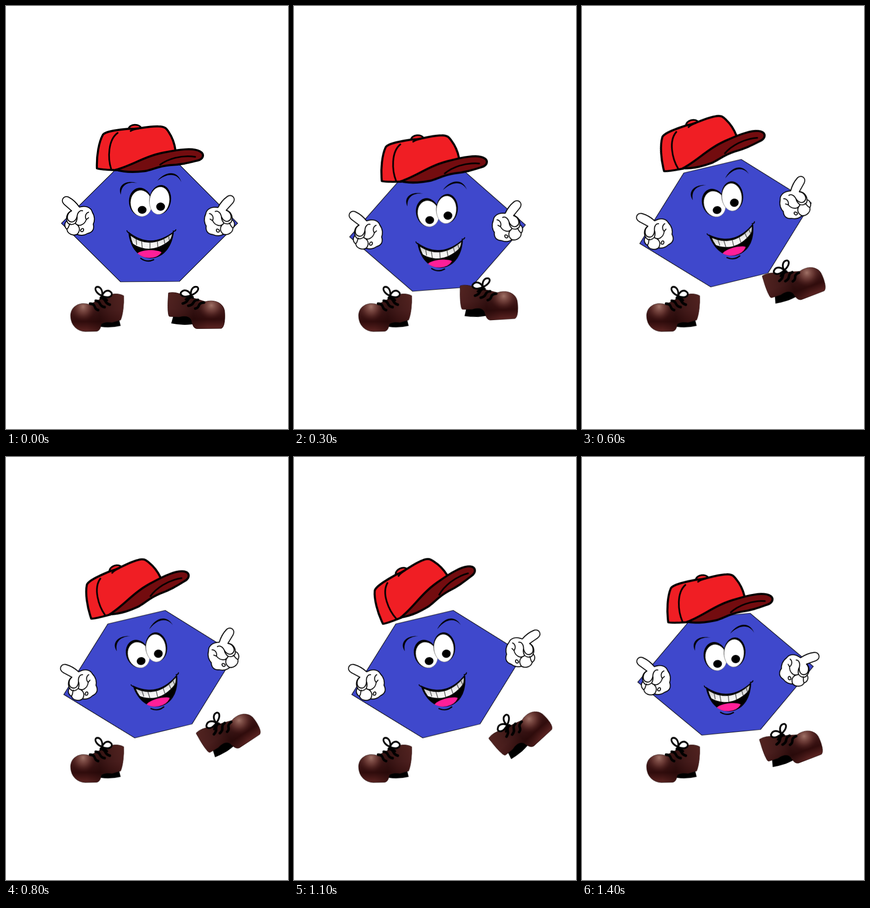
Recreate the animation shown at these times as an HTML page without scripts. Size 611 px wide and 917 px high, loop 1500 ms.

```html
<!DOCTYPE html>
<html lang="en">
<head>
<meta charset="utf-8">
<title>Dancing hexagon</title>
<style>
  html, body { margin: 0; width: 100%; height: 100%; overflow: hidden; background: #fff; }
  svg { display: block; width: 100%; height: 100%; }

  /* Ten poses a second: each span between keyframes is cut into 100 ms steps. */
  .move { animation: 1.5s steps(2) infinite; }
  #body { animation-name: body; transform-origin: 311px 471px; }
  #face { animation-name: face; transform-origin: 311px 471px; }
  #cap { animation-name: cap; transform-origin: 312px 339px; }
  #left-hand { animation-name: left-hand; transform-origin: 163px 468px; }
  #right-hand { animation-name: right-hand; transform-origin: 460px 469px; }
  #right-shoe { animation-name: right-shoe; transform-origin: 412px 660px; }

  @keyframes body {
    0%, 100% { transform: translate(0, 0) rotate(0deg); }
    13.333% { transform: translate(0, 33px) rotate(0deg); }
    26.666% { transform: translate(0, 0) rotate(-7.8deg); }
    40% { transform: translate(0, 0) rotate(-13.3deg); }
    73.333% { transform: translate(0, 0) rotate(-13.3deg); animation-timing-function: steps(3); }
    93.333% { transform: translate(0, 0) rotate(-5.1deg); animation-timing-function: steps(1); }
  }
  @keyframes face {
    0%, 100% { transform: translate(0, 0) rotate(0deg); }
    13.333% { transform: translate(0, 33px) rotate(0deg); }
    26.666% { transform: translate(2px, 9px) rotate(-7.8deg); }
    40% { transform: translate(4px, -4px) rotate(-13.3deg); }
    73.333% { transform: translate(4px, -4px) rotate(-13.3deg); animation-timing-function: steps(3); }
    93.333% { transform: translate(1.3px, 5px) rotate(-5.1deg); animation-timing-function: steps(1); }
  }
  @keyframes cap {
    0%, 100% { transform: translate(0, 0) rotate(0deg); }
    13.333% { transform: translate(0, 32px) rotate(0deg); }
    26.666% { transform: translate(-15.5px, 9px) rotate(-7deg); }
    40% { transform: translate(-25px, -19.5px) rotate(-13deg); }
    53.333% { transform: translate(-21.5px, -35.5px) rotate(-17.5deg); animation-timing-function: steps(1); }
    60% { transform: translate(-21px, -43.5px) rotate(-19.7deg); }
    73.333% { transform: translate(-19.5px, -36px) rotate(-24deg); animation-timing-function: steps(3); }
    93.333% { transform: translate(-12px, -5px) rotate(-5.7deg); animation-timing-function: steps(1); }
  }
  @keyframes left-hand {
    0%, 100% { transform: translate(0, 0) rotate(0deg); }
    13.333% { transform: translate(0, 33px) rotate(0deg); }
    26.666% { transform: translate(1px, 26px) rotate(-8deg); }
    40% { transform: translate(5.5px, 28px) rotate(-13deg); }
    80% { transform: translate(5.5px, 28px) rotate(-13deg); }
    93.333% { transform: translate(.5px, 18px) rotate(-5deg); animation-timing-function: steps(1); }
  }
  @keyframes right-hand {
    0%, 100% { transform: translate(0, 0) rotate(0deg); }
    13.333% { transform: translate(0, 33px) rotate(0deg); }
    26.666% { transform: translate(0, -8px) rotate(-6deg); }
    40% { transform: translate(0, -37px) rotate(-13deg); }
    53.333% { transform: translate(9px, -36px) rotate(-11deg); animation-timing-function: steps(3); }
    73.333% { transform: translate(28px, -43px) rotate(13deg); animation-timing-function: steps(3); }
    93.333% { transform: translate(-1px, -5px) rotate(28deg); animation-timing-function: steps(1); }
  }
  @keyframes right-shoe {
    0%, 13.333%, 100% { transform: translate(0, 0) rotate(0deg); }
    26.666% { transform: translate(20px, -37px) rotate(-6deg); }
    40% { transform: translate(48px, -60px) rotate(-20.5deg); }
    53.333% { transform: translate(71px, -62px) rotate(-33deg); animation-timing-function: steps(3); }
    73.333%, 80% { transform: translate(80px, -62px) rotate(-42deg); }
    93.333% { transform: translate(42px, -33px) rotate(-20.5deg); animation-timing-function: steps(1); }
  }
</style>
</head>
<body>
<svg viewBox="0 0 611 917" preserveAspectRatio="none">
  <defs>
    <linearGradient id="leather" x1="0" y1="0" x2="0" y2="1">
      <stop offset="0" stop-color="#4a1f1c"/>
      <stop offset=".45" stop-color="#431a1a"/>
      <stop offset=".74" stop-color="#300c0c"/>
      <stop offset="1" stop-color="#5c2422"/>
    </linearGradient>
    <linearGradient id="shade">
      <stop offset="0" stop-color="#6b322e" stop-opacity=".25"/>
      <stop offset=".45" stop-color="#1c0606" stop-opacity=".4"/>
      <stop offset=".7" stop-color="#1c0606" stop-opacity="0"/>
    </linearGradient>
    <radialGradient id="shine" gradientUnits="userSpaceOnUse" cx="445" cy="649" r="30">
      <stop offset="0" stop-color="#a07267"/>
      <stop offset=".5" stop-color="#74413b" stop-opacity=".7"/>
      <stop offset="1" stop-color="#4a1c1a" stop-opacity="0"/>
    </radialGradient>
    <linearGradient id="enamel" x1="0" y1="0" x2="0" y2="1">
      <stop offset="0" stop-color="#bbb"/>
      <stop offset=".7" stop-color="#f4f4f4"/>
    </linearGradient>

    <path id="square-toe" d="M352 622C364 619 374 623 386 627L432 641C452 635 474 644 474 666C475 684 472 698 466 699L414 699.500C406 699 404 691 402 681C397 671 386 671 375 674L354 673C350 671 350 645 352 622Z"/>
    <path id="round-toe" d="M351 627C364 621 376 623 388 626L430 645C455 638 474 650 474 668C473 688 458 699 440 699.500L414 699C406 698 404 691 403 684C394 679 386 680 378 681L358 676C353 665 350 645 351 627Z"/>
    <path id="heel" d="M363 670L358 688Q382 693 404 690L404 672Z"/>
    <g id="laces" fill="none" stroke="#000" stroke-linecap="round">
      <path stroke-width="5.500" d="M383 645Q391 643 394 637T404 631M395 650Q403 649 406 643T416 637M410 656Q416 655 418 649T429 643"/>
      <path stroke-width="3.800" fill="#fff" d="M401 627C399 616 405 607 414 609C420 612 415 622 401 627C396 616 386 613 379 621C376 629 389 633 401 627Z"/>
      <path stroke-width="4" d="M401 627L389 636M401 627L405 633"/>
    </g>

    <g id="hand" fill="#fff" stroke="#000" stroke-width="2" stroke-linecap="round" stroke-linejoin="round">
      <path d="M142 444L126 430C117 422 125 409 136 414.500C146 420 153 427 159 436C172 432 184 436 187 447C192 455 193 465 189 473C192 484 187 491 177 493C169 498 160 498 154 495C145 499 133 494 132 484C126 479 126 470 132 466C129 456 134 447 142 444Z"/>
      <path fill="none" d="M142 444C132 449 130 463 138 467C146 471 152 464 154 456C155 448 160 442 166 444M154 456C155 464 152 468 150 471C158 480 170 474 174 463M174 463C170 456 173 449 179 447M174 463L179 459M132 466C134 474 142 476 150 471M132 484C138 478 136 474 139 472M154 495C161 488 160 480 155 475M163 484C168 479 170 486 166 489C162 490 160 487 163 484"/>
    </g>
  </defs>

  <rect width="611" height="917" fill="#fff"/>

  <polygon id="body" class="move" points="120,471 248,598 376,597 502,471 376,344 248,344" fill="#3f48cc" stroke="#000" stroke-width="1.200"/>

  <g id="face" class="move">
    <path d="M249 409C241 392 256 375 285 384C264 380 249 388 249 409ZM328 379C341 361 371 352 380 382C370 360 347 363 328 379Z"/>
    <ellipse cx="291.500" cy="425" rx="25" ry="31" transform="rotate(-8 291.500 425)"/>
    <ellipse cx="293" cy="428" rx="23" ry="28.500" fill="#fff" stroke="#777" stroke-width=".7" transform="rotate(-8 293 428)"/>
    <ellipse cx="334" cy="420" rx="23.500" ry="32" transform="rotate(8 334 420)"/>
    <ellipse cx="332.500" cy="422" rx="21.500" ry="30" fill="#fff" stroke="#777" stroke-width=".7" transform="rotate(8 332.500 422)"/>
    <ellipse cx="295" cy="442" rx="9.500" ry="8.500"/>
    <ellipse cx="335" cy="435" rx="9.500" ry="9"/>
    <path d="M265 489Q313 528 364 488C361 517 345 547 312 547C281 545 267 516 265 489Z"/>
    <path d="M285 536C294 528 326 527 337 534C331 543 321 546 311 546C300 546 291 542 285 536Z" fill="#ff1f98"/>
    <path d="M270 498Q312 530 360 494Q358 504 354 508Q344 517 328 523Q311 529 294 524Q281 520 275 515Q271 506 270 498Z" fill="url(#enamel)"/>
    <path d="M282 505L283 518M294 510L295 524M312 512L312 527M328 510L329 523M342 504L344 515M352 498L354 508" stroke="#444" stroke-width="1.500"/>
    <g fill="none" stroke="#000" stroke-linecap="round">
      <path stroke-width="2" d="M262 487Q263 491 267 492M362 488Q367 489 368 485"/>
      <path stroke-width="2.500" d="M292 547Q305 557 320 550"/>
    </g>
  </g>

  <g id="cap" class="move" stroke="#000" stroke-width="4.500" stroke-linecap="round" stroke-linejoin="round">
    <path d="M265 267C268 255 289 254 294 266Z" fill="#f01e24" stroke-width="3.500"/>
    <path d="M197 352C196 325 201 295 210 279C216 271 245 268 268 266C285 268 305 260 330 261C345 261 348 266 353 274C361 286 365 298 367 312L360 335L300 350L238 356C225 355 205 355 197 352Z" fill="#f01e24"/>
    <path d="M238 355C270 347 300 326 340 318C375 311 405 307 420 315C431 321 428 332 415 335C395 340 380 344 355 345C330 347 315 356 300 358C275 361 255 360 238 355Z" fill="#730c0f"/>
    <path d="M242 275C221 290 220 330 228 354M270 271Q276 267 287 266M334 344C350 332 380 322 410 327" fill="none" stroke-width="3.500"/>
  </g>

  <use id="left-hand" class="move" href="#hand"/>
  <g id="right-hand" class="move">
    <use href="#hand" transform="translate(459 469) rotate(-6.500) scale(-1 1) translate(-163 -468)"/>
  </g>

  <g transform="translate(197.500 656.500) scale(-.935 1.065) translate(-412.500 -653.500)">
    <use href="#heel"/>
    <use href="#round-toe" fill="url(#leather)" stroke="#2b1110"/>
    <use href="#round-toe" fill="url(#shade)"/>
    <use href="#round-toe" fill="url(#shine)"/>
    <use href="#laces"/>
  </g>
  <g id="right-shoe" class="move">
    <use href="#heel"/>
    <use href="#square-toe" fill="url(#leather)" stroke="#2b1110"/>
    <use href="#square-toe" fill="url(#shade)"/>
    <use href="#square-toe" fill="url(#shine)"/>
    <use href="#laces"/>
  </g>
</svg>
</body>
</html>
```
